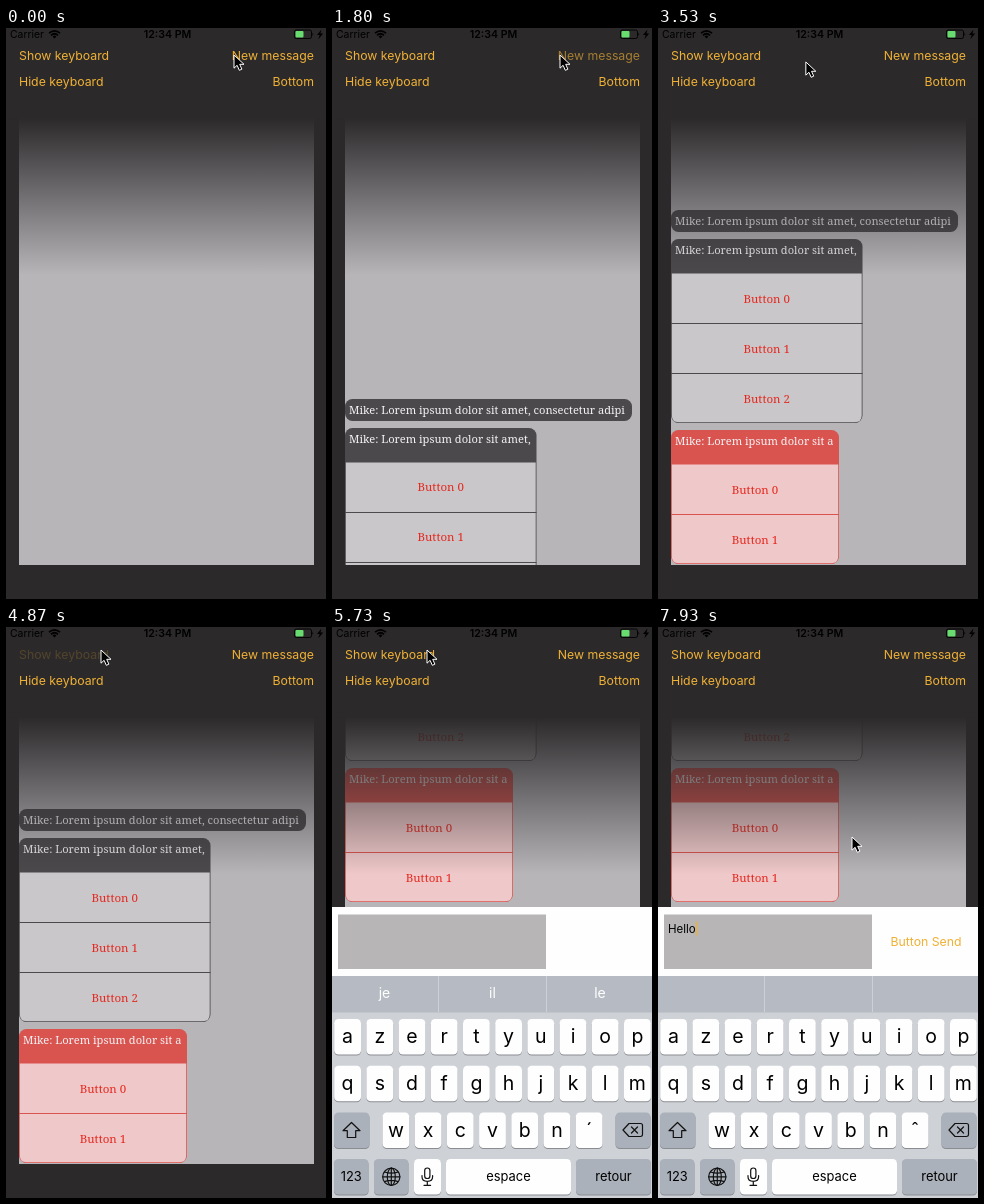
Write an HTML page that moves like this. It is 320 by 571 pixels and loops after 8 s.

```html
<!DOCTYPE html>
<html lang="en">
<head>
<meta charset="utf-8">
<title>Chat keyboard</title>
<style>
  html, body { margin: 0; width: 100%; height: 100%; overflow: hidden; background: #2b292a; }
  svg { display: block; width: 100vw; height: 100vh; }
  text { font: 12.3px Inter, sans-serif; white-space: pre; }
  .mid { text-anchor: middle; }
  .end { text-anchor: end; }
  .link { fill: #efb136; }
  .status { font-size: 10.4px; }
  .bubble text { font: 11.1px "Noto Serif", serif; fill: #f4f2f4; }
  .bubble text.mid { font-size: 11.5px; fill: #e5281f; }
  .letter { font-size: 19.5px; }
  .word { font-size: 12.9px; }
  .hint { font-size: 14px; fill: #fff; }
  .icon { fill: none; stroke: #111; stroke-width: 1.2; stroke-linejoin: round; stroke-linecap: round; }
</style>
</head>
<body>
<svg viewBox="0 0 320 571">
  <defs>
    <linearGradient id="fade" x1="0" y1="0" x2="0" y2="1">
      <stop stop-color="#2b292a"/>
      <stop offset="1" stop-color="#2b292a" stop-opacity="0"/>
    </linearGradient>
  </defs>
  <rect width="320" height="571" fill="#2b292a"/>
  <rect x="13" y="80" width="295" height="457" fill="#b7b5b8"/>
  <g id="messages"></g>
  <rect width="320" height="90.5" fill="#2b292a"/>
  <rect x="12" y="90" width="297" height="157" fill="url(#fade)"/>
  <rect y="537" width="320" height="34" fill="#2b292a"/>

  <g id="statusBar">
    <text class="status" x="4" y="10">Carrier</text>
    <g class="icon" stroke-width="1.6" style="stroke:#000;stroke-width:1.7;stroke-linecap:butt">
      <path d="M43 5.2Q48.5 .4 54 5.2M45 7.3Q48.5 4.2 52 7.3"/>
      <path d="M46.6 8.4Q48.5 6.8 50.4 8.4L48.5 10.4Z" style="fill:#000;stroke:none"/>
    </g>
    <text class="status mid" x="161.5" y="10" font-weight="600" style="font-weight:600;font-size:10.6px">12:34 PM</text>
    <rect x="288.5" y="2" width="17" height="8.5" rx="1.8" fill="none" stroke="#000" stroke-width=".9"/>
    <rect x="289.5" y="3" width="8" height="6.5" rx="1" fill="#69dc70"/>
    <path d="M306.5 4.5q1.6 1.7 0 3.4z"/>
    <path d="M315.5 1.5L311 7h2.7l-1.4 4.2 4.9-5.7h-2.8z"/>
  </g>

  <text id="show" class="link" x="13" y="32.3">Show keyboard</text>
  <text class="link" x="13" y="58.3">Hide keyboard</text>
  <text id="newMessage" class="link end" x="308" y="32.3">New message</text>
  <text class="link end" x="308" y="58.3">Bottom</text>

  <g id="keyboard">
    <rect y="280" width="320" height="69" fill="#fefefe"/>
    <rect x="6" y="287.5" width="208" height="54.5" fill="#b7b5b6"/>
    <text id="typed" x="10" y="305.8" style="font-size:11.5px"></text>
    <rect id="caret" y="294.5" width="1.4" height="14" fill="#efb136"/>
    <text id="send" class="link mid" x="268" y="319.3">Button Send</text>
    <rect y="349" width="320" height="222" fill="#ced2d7"/>
    <rect y="349" width="320" height="36.5" fill="#b6bbc3"/>
    <path d="M106.5 349v36M214.5 349v36" stroke="#cdd1d6"/>
    <g id="hints">
      <text class="hint mid" x="52.5" y="371">je</text>
      <text class="hint mid" x="160.5" y="371">il</text>
      <text class="hint mid" x="268" y="371">le</text>
    </g>
    <g id="keys"></g>
    <g class="icon">
      <path d="M19.5 495.5l8.5 8.2h-4.3v6.8h-8.4v-6.8H11z"/>
      <path d="M297 496.5h11.5q2 0 2 2v9q0 2-2 2H297l-6-6.5zM299.5 500l6 6m0-6l-6 6"/>
      <circle cx="59.3" cy="549.8" r="8.6"/>
      <ellipse cx="59.3" cy="549.8" rx="4" ry="8.6"/>
      <path d="M50.7 549.8h17.2M59.3 541.2v17.2M52.5 545q6.8 2.4 13.6 0M52.5 554.6q6.8-2.4 13.6 0"/>
      <rect x="92.7" y="541" width="5.2" height="10.5" rx="2.6"/>
      <path d="M90 548.5v1.2q0 4.6 5.3 4.6t5.3-4.6v-1.2M95.3 554.3v3.8M92 558.3h6.6"/>
    </g>
  </g>
  <path id="cursor" d="M0 0V13.2L3.1 10.3 5.3 15.3 7.9 14.2 5.7 9.3H10Z" stroke="#fff" stroke-width="1"/>
</svg>
<script>
const $ = id => document.getElementById(id);
const LOOP = 8000;
const clamp = x => Math.min(1, Math.max(0, x));
const smooth = x => (x = clamp(x), x * x * (3 - 2 * x));
const easeOut = x => 1 - (1 - clamp(x)) ** 3;

// Message bubbles: a header and an optional stack of buttons.
function bubble(y, width, text, color, body, buttons) {
  const header = 34.5, row = 50, height = buttons ? header + row * buttons - .5 : 22;
  let out = `<g class="bubble" transform="translate(13 ${y})">
    <rect width="${width}" height="${height}" rx="7.5" fill="${color}"/>`;
  if (buttons) {
    const w = width - 1, bottom = height - .8;
    out += `<path d="M.8 ${header}H${w + .2}V${bottom - 7}q0 7-7 7H7.8q-7 0-7-7z" fill="${body}"/>`;
    for (let i = 0; i < buttons; i++) {
      const top = header + i * row;
      if (i) out += `<path d="M0 ${top}H${width}" stroke="${color}"/>`;
      out += `<text class="mid" x="${width / 2}" y="${top + 29}">Button ${i}</text>`;
    }
  }
  return out + `<text x="4" y="15">${text}</text></g>`;
}
const dark = '#4b494b', red = '#d9534f';
$('messages').innerHTML =
  bubble(0, 287, 'Mike: Lorem ipsum dolor sit amet, consectetur adipi', dark) +
  bubble(29, 191.5, 'Mike: Lorem ipsum dolor sit amet,', dark, '#c9c7c9', 3) +
  bubble(220, 168, 'Mike: Lorem ipsum dolor sit a', red, '#efc8c9', 2);

// Keyboard keys
function key(x, y, width, label = '', type = 'word', fill = '#fefefe') {
  const shape = dy => `x="${x}" y="${y + dy}" width="${width}" height="35.5" rx="4.3"`;
  const baseline = y + (type === 'letter' ? 24.3 : 22.2);
  return `<rect ${shape(1)} fill="#898c91"/><rect ${shape(0)} fill="${fill}"/>
    <text class="${type} mid" x="${x + width / 2}" y="${baseline}">${label}</text>`;
}
const letters = (chars, x, y) =>
  [...chars].map((c, i) => key(x + i * 32.2, y, 26.8, c, 'letter')).join('');
const gray = '#abb1ba';
$('keys').innerHTML =
  letters('azertyuiop', 2.2, 392) + letters('qsdfghjklm', 2.2, 438.7) +
  key(2, 485.5, 35.5, '', 'word', gray) + letters('wxcvbn´', 50.5, 485.5) +
  key(283.5, 485.5, 35, '', 'word', gray) +
  key(2, 532, 34.5, '123', 'word', gray) + key(42, 532, 34.5, '', 'word', gray) +
  key(82, 532, 27, '') + key(114, 532, 125, 'espace') +
  key(244, 532, 75, 'retour', 'word', gray);
const accent = [...document.querySelectorAll('.letter')].pop();

// Timeline
const sends = [[500, 29], [1598, 191], [2935, 142]];  // release time, scroll distance
const showTime = 4930;
const keyTimes = [6150, 6350, 6600, 6760, 7000];
const path = [[0, 228, 27], [3200, 228, 27], [3530, 148, 34], [3850, 95, 23],
              [7200, 95, 23], [7900, 194, 210], [LOOP, 194, 210]];

// A pressed label dims at once and recovers after release.
const pressed = (t, up) =>
  t < up - 200 ? 1 : t < up ? .2 : Math.min(1, .2 + .8 * (t - up) / 380);

function cursorAt(t) {
  const i = path.findIndex(p => p[0] > t);
  const [t0, x0, y0] = path[i - 1], [t1, x1, y1] = path[i];
  const p = (t - t0) / (t1 - t0);
  return [x0 + (x1 - x0) * p, y0 + (y1 - y0) * p];
}

function draw(t) {
  const rise = easeOut((t - showTime) / 300);
  let top = 544 - 261 * rise;
  for (const [time, distance] of sends) top -= distance * smooth((t - time) / 300);
  $('messages').setAttribute('transform', `translate(0 ${top})`);
  $('keyboard').setAttribute('transform', `translate(0 ${291 * (1 - rise)})`);

  $('newMessage').setAttribute('opacity', Math.min(...sends.map(s => pressed(t, s[0]))));
  $('show').setAttribute('opacity', pressed(t, showTime));

  const count = keyTimes.filter(k => k <= t).length;
  $('typed').textContent = 'Hello'.slice(0, count);
  accent.textContent = count === 5 ? 'ˆ' : '´';
  $('hints').setAttribute('opacity', count ? 0 : 1);
  $('send').setAttribute('opacity', clamp((t - keyTimes[0]) / 250));

  const idle = t - (count ? keyTimes[count - 1] : showTime + 320);
  $('caret').setAttribute('x', 10 + (count ? $('typed').getComputedTextLength() : 0));
  $('caret').setAttribute('opacity', idle >= 0 && idle % 900 < 450 ? 1 : 0);

  $('cursor').setAttribute('transform', `translate(${cursorAt(t)})`);
}

function frame() {
  draw(performance.now() % LOOP);
  requestAnimationFrame(frame);
}
frame();
</script>
</body>
</html>
```
